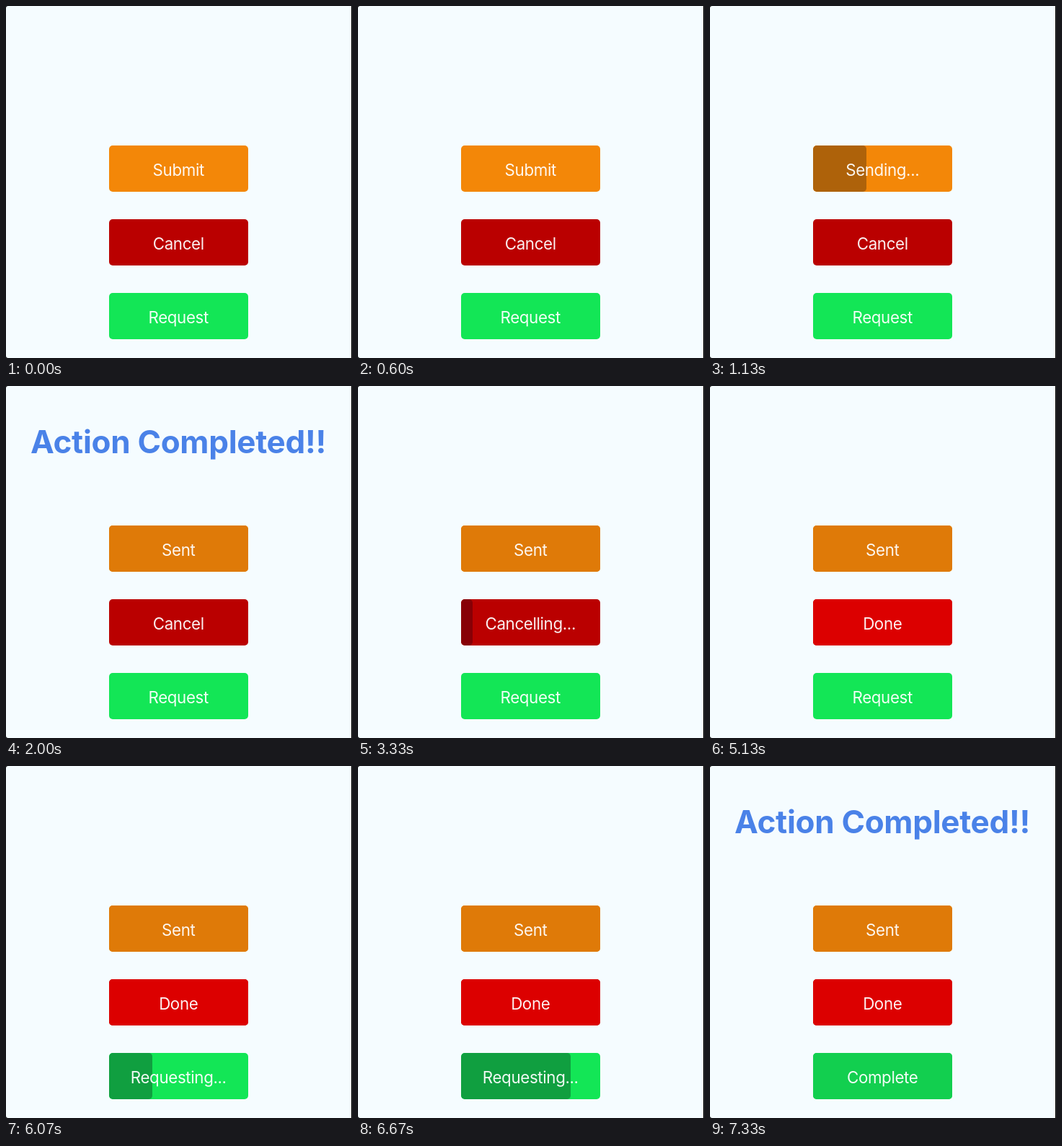
Recreate the animation shown at these times as an HTML page. Size 480 by 487 pixels, loop 7.39 s.

```html
<!DOCTYPE html>
<html lang="en">
<head>
<meta charset="utf-8">
<title>Progress buttons</title>
<style>
  /* 0 = idle, 0.001 to 1 = filling, 2 = done */
  @property --p { syntax: "<number>"; inherits: true; initial-value: 0; }

  html, body { margin: 0; width: 100%; height: 100%; overflow: hidden; background: #000; }

  .stage {
    position: relative;
    width: 480px;
    height: 487px;
    overflow: hidden;
    font-family: Inter, Roboto, sans-serif;
  }
  .page {
    position: absolute;
    inset: 0 1px 0 0;
    background: #f5fcff;
    border-radius: 3px 0 0 3px;
  }

  h1 {
    position: absolute;
    left: 0;
    top: 49px;
    width: 478px;
    margin: 0;
    font-size: 44px;
    font-weight: 700;
    letter-spacing: -.3px;
    line-height: 56px;
    text-align: center;
    white-space: nowrap;
    color: #4a82e8;
    animation: notice 7390ms step-end infinite;
  }

  .button {
    position: absolute;
    left: 143px;
    top: var(--top);
    width: 192.5px;
    height: 64px;
    border-radius: 5px;
    overflow: hidden;
    background: var(--base);
    color: rgba(255, 255, 255, .94);
    font-size: 22.3px;
    letter-spacing: -.35px;
    line-height: 67px;
    text-align: center;
    animation: 7390ms linear infinite;
  }
  .button > * { position: absolute; inset: 0; }
  .idle { opacity: calc(1 - var(--p) * 1000); }
  .busy, .bar { opacity: calc(min(var(--p), 1.001 - var(--p)) * 1000); }
  .done { opacity: calc((var(--p) - 1) * 1000); background: var(--end); }
  .button .bar {
    right: auto;
    width: calc(var(--p) * 100%);
    border-radius: 5px;
    background: var(--fill);
  }

  .submit { --top: 193px; --base: #f38708; --fill: #ae620a; --end: #df7a08; animation-name: submit; }
  .cancel { --top: 295px; --base: #ba0000; --fill: #870006; --end: #dc0000; animation-name: cancel; }
  .request { --top: 397px; --base: #13e656; --fill: #109f40; --end: #12cf4f; animation-name: request; }

  @keyframes submit {
    0%, 8.78% { --p: 0; }
    8.781% { --p: .001; }
    25.7% { --p: 1; }
    25.701%, 100% { --p: 2; }
  }
  @keyframes cancel {
    0%, 43.64% { --p: 0; }
    43.641% { --p: .001; }
    60.56% { --p: 1; }
    60.561%, 100% { --p: 2; }
  }
  @keyframes request {
    0%, 76.9% { --p: 0; }
    76.901% { --p: .001; }
    93.82% { --p: 1; }
    93.821%, 100% { --p: 2; }
  }
  @keyframes notice {
    0%, 32.4%, 67.4% { opacity: 0; }
    25.7%, 60.56%, 93.82%, 100% { opacity: 1; }
  }
</style>
</head>
<body>
<div class="stage">
  <div class="page"></div>
  <h1>Action Completed!!</h1>
  <div class="button submit">
    <div class="bar"></div>
    <span class="idle">Submit</span>
    <span class="busy">Sending...</span>
    <span class="done">Sent</span>
  </div>
  <div class="button cancel">
    <div class="bar"></div>
    <span class="idle">Cancel</span>
    <span class="busy">Cancelling...</span>
    <span class="done">Done</span>
  </div>
  <div class="button request">
    <div class="bar"></div>
    <span class="idle">Request</span>
    <span class="busy">Requesting...</span>
    <span class="done">Complete</span>
  </div>
</div>
</body>
</html>
```
